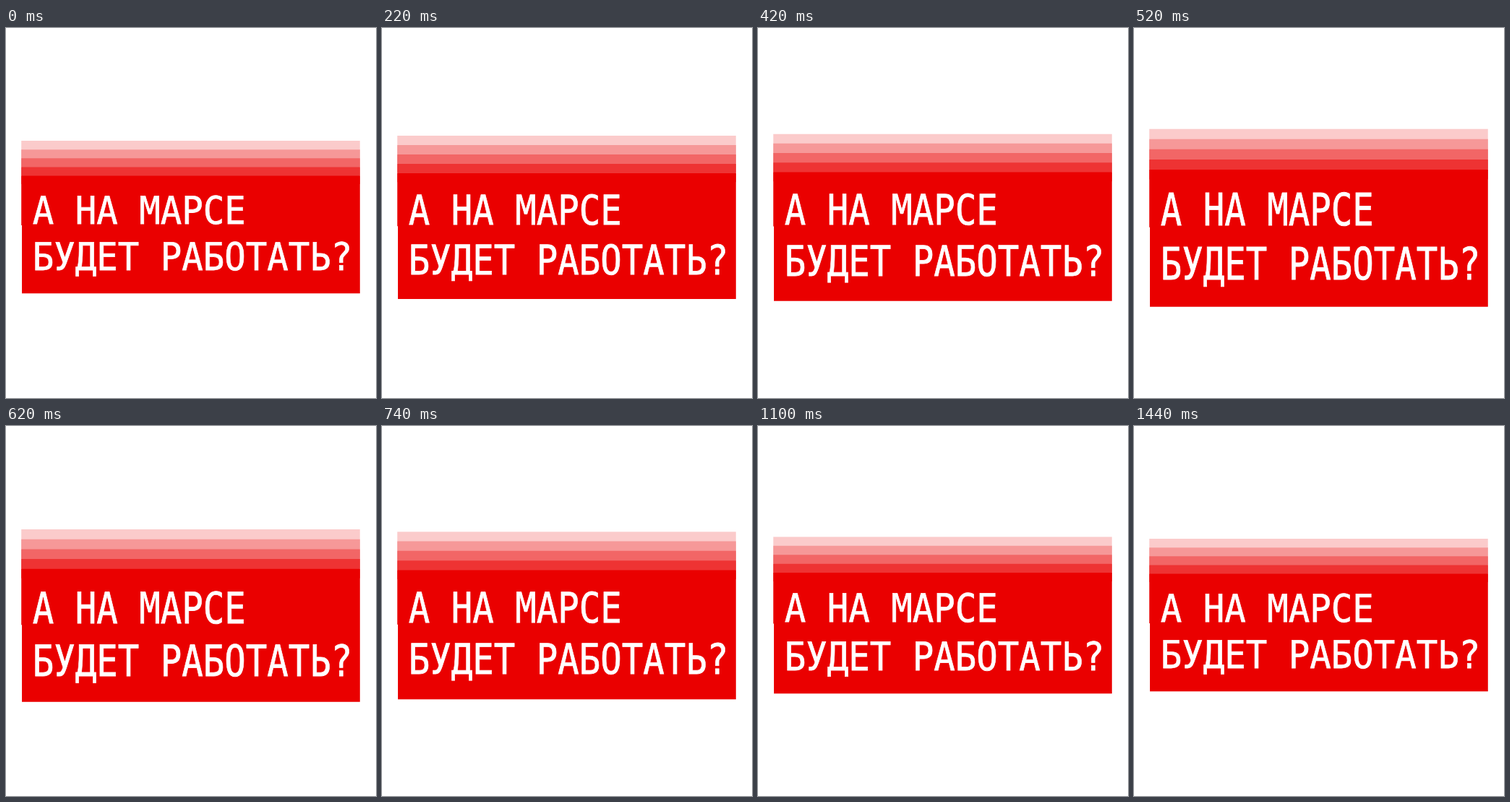
An HTML page that plays this animation: 512 by 512 pixels, repeating every 1460 ms.

```html
<!DOCTYPE html>
<html lang="ru">
<head>
<meta charset="utf-8">
<title>Beat</title>
<style>
  html, body { margin: 0; width: 100%; height: 100%; overflow: hidden; background: #fff; }
  svg { display: block; width: 100vw; height: 100vh; }

  /* Double heartbeat: a strong kick, a softer one, then a slow release */
  .card {
    transform-origin: 256px 256px;
    animation: beat 1460ms infinite;
  }
  @keyframes beat {
    0%     { transform: scaleY(1);     animation-timing-function: cubic-bezier(.333, 0, .667, 1); }
    6.85%  { transform: scaleY(1.34);  animation-timing-function: cubic-bezier(.333, .667, .667, 1); }
    20.55% { transform: scaleY(1.02);  animation-timing-function: cubic-bezier(.333, 0, .667, 1); }
    36.99% { transform: scaleY(1.168); animation-timing-function: linear; }
    42.47% { transform: scaleY(1.131); animation-timing-function: cubic-bezier(.333, .617, .7, 1); }
    100%   { transform: scaleY(1); }
  }

  text {
    font: 49px "DejaVu Sans Mono", "Noto Sans Mono", monospace;
    fill: #fff;
    stroke: #fff;
    stroke-width: .7px;
    white-space: pre;
    text-rendering: geometricPrecision;
  }
</style>
</head>
<body>
<svg viewBox="0 0 512 512">
  <g class="card">
    <path fill="#fbcbcb" d="M21.2 156.1H489.8V180H21.2z"/>
    <path fill="#f69898" d="M21.2 168.2H489.8V192H21.2z"/>
    <path fill="#f26666" d="M21.2 180.3H489.8V204H21.2z"/>
    <path fill="#ee3333" d="M21.2 192.4H489.8V216H21.2z"/>
    <path fill="#ea0000" d="M21.2 204.5H489.8V367.3H22V273H21.2z"/>
    <!-- tall lettering -->
    <g transform="translate(36.8 271) scale(1 1.08)">
      <text>А НА МАРСЕ</text>
      <text y="59.6">БУДЕТ РАБОТАТЬ?</text>
    </g>
  </g>
</svg>
</body>
</html>
```
